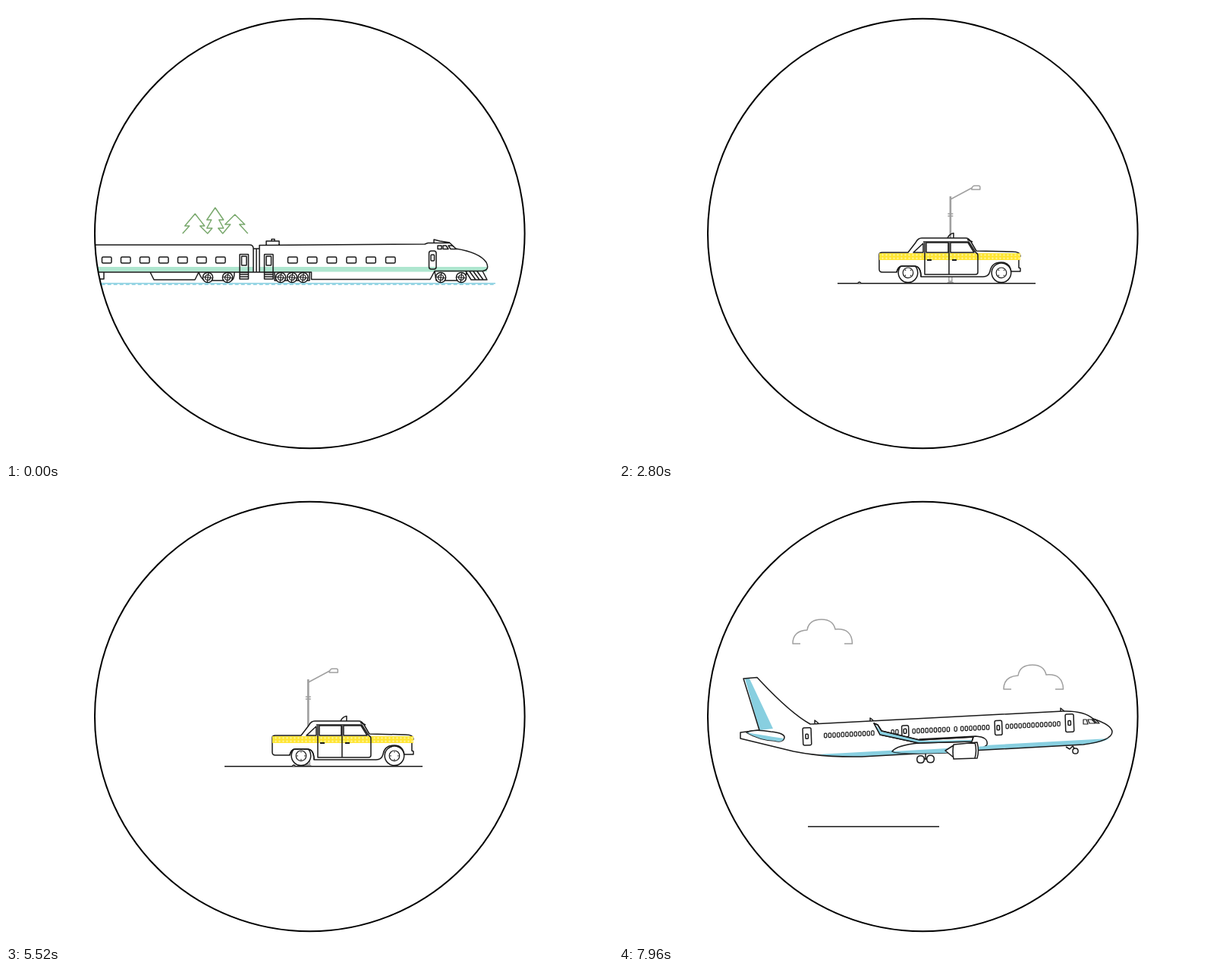
An HTML page for the animation above (8 s loop, 800 by 600 pixels).

```html
<!DOCTYPE html>
<html lang="en">
<head>
<meta charset="utf-8">
<title>Train, taxi, plane</title>
<style>
html, body { margin: 0; width: 100%; height: 100%; overflow: hidden; background: #fff; }
svg { display: block; width: 800px; height: 600px; }
</style>
</head>
<body>
<svg id="stage" viewBox="0 0 800 600" fill="none" stroke="#1a1a1a" stroke-width="1.5" stroke-linejoin="round">
  <defs>
    <pattern id="check" width="5" height="4.5" y="326" patternUnits="userSpaceOnUse">
      <path d="M0 0H5V4.5H0Z" fill="#ffe534" stroke="none"/>
      <path d="M2.5 .8L4 2.2L2.5 3.7L1 2.2Z" fill="#fff5a8" stroke="none"/>
    </pattern>
    <clipPath id="disc"><circle cx="400.3" cy="300" r="283"/></clipPath>
    <clipPath id="street"><rect x="274.5" y="230" width="287" height="140"/></clipPath>
    <clipPath id="road"><rect x="288" y="355" width="261" height="20"/></clipPath>
  </defs>
</svg>
<script>
const stage = document.getElementById('stage');
const BLUE = '#88cfe0', YELLOW = '#ffe40a', MINT = '#aee6cf', GREY = '#a0a0a0', GREEN = '#7aa96e';

function add(parent, tag, attrs = {}) {
  const el = document.createElementNS('http://www.w3.org/2000/svg', tag);
  for (const k in attrs) el.setAttribute(k, attrs[k]);
  return parent.appendChild(el);
}
const group = (parent, attrs) => add(parent, 'g', attrs);
function wipe(id) {
  return add(add(stage.querySelector('defs'), 'clipPath', { id }), 'rect', { y: 0, height: 600 });
}

// Strokes that draw themselves during [in0, in1] and retract during [out0, out1].
const strokes = [];
function line(parent, d, times, attrs = {}) {
  const el = add(parent, 'path', { d, pathLength: 1, ...attrs });
  if (times) strokes.push({ el, times });
  return el;
}
const spinners = [];
function wheel(parent, cx, cy, r, spokes, times) {
  const ring = q => `M${cx - q} ${cy}a${q} ${q} 0 1 1 ${2 * q} 0a${q} ${q} 0 1 1 ${-2 * q} 0`;
  line(parent, ring(r), times, { fill: '#fff' });
  const hub = group(parent);
  line(hub, ring(r * .53), times, { 'stroke-width': 1.2 });
  line(hub, spokes, times, { 'stroke-width': 1.2, transform: `translate(${cx} ${cy})` });
  spinners.push({ hub, cx, cy, r });
}
const box = (x, y, w, h, r = 1.5) =>
  `M${x + r} ${y}h${w - 2 * r}q${r} 0 ${r} ${r}v${h - 2 * r}q0 ${r} ${-r} ${r}h${2 * r - w}q${-r} 0 ${-r} ${-r}v${2 * r - h}q0 ${-r} ${r} ${-r}z`;

const progress = (t, a, b) => Math.min(1, Math.max(0, (t - a) / (b - a)));
const smooth = p => .5 - .5 * Math.cos(Math.PI * p);
function along(t, keys, ease = p => p) {
  if (t <= keys[0][0]) return keys[0][1];
  for (let i = 1; i < keys.length; i++) {
    const [t0, v0] = keys[i - 1], [t1, v1] = keys[i];
    if (t <= t1) return v0 + (v1 - v0) * ease(progress(t, t0, t1));
  }
  return keys.at(-1)[1];
}
const shift = (el, x, y = 0) => el.setAttribute('transform', `translate(${x} ${y})`);
const show = (el, on) => el.setAttribute('display', on ? 'inline' : 'none');
const span = (rect, a, b) => {
  rect.setAttribute('x', a);
  rect.setAttribute('width', Math.max(0, b - a));
};

const scene = group(stage, { 'clip-path': 'url(#disc)' });

// Railway
const trees = [0, 460].map(offset => ({
  offset,
  el: line(scene, 'M233 300L242 290H236L249.500 274L262 290H256L266 300L272 293H265L271 282H265L276 266L287 282H281L287 293H280L286 300L296 288H289L302 275L315 288H308L319 300',
    offset ? [-1, 0, 1250, 1650] : null, { stroke: GREEN })
}));
const trackWipe = wipe('trackWipe'), trainWipe = wipe('trainWipe');
const rails = group(scene, { 'clip-path': 'url(#trackWipe)', stroke: BLUE });
add(rails, 'path', { d: 'M110 365.700H690' });
const sleepers = add(rails, 'path', { d: 'M110 367.200H690', 'stroke-dasharray': '5 3' });

const train = group(scene, { 'clip-path': 'url(#trainWipe)' });
add(train, 'path', { d: 'M110 347.300H326M334 347.300H634', stroke: MINT, 'stroke-width': 6.5 });
add(train, 'path', { d: [
  'M110 315H321Q326 315 326 320V351H110M110 360H129V351M190 351L195 361H249L254 351',
  'M326 320H334M330 320V351M326 351H334',
  'M254 351Q258 362 263 362H296Q301 362 301 351',
  'M334 351V315.500L552 314L556 312.500H585L593 320Q624 325 633 338Q638 348 628 349.500H565L559 360.500H402.500V351H334',
  'M343 315V310H360V315M350 310V307.500H354V310M564 312V308L572 310L585 312',
  'M354 351V362H400V351M565 350L567 362H605L607 350',
  'M606 350L613 361H634L628 349.500M611 350L619 361M616 350L624 361M621 350L629 361',
  'M569 316h5v4.500h-5zM576 316h4l3 4.500h-7zM583 316h5l6 4.500h-8z',
  box(557.5, 323, 9.5, 24, 3), box(560, 328, 4.5, 8, 1)
].join('') });
for (let i = 0; i < 7; i++) add(train, 'path', { d: box(126.5 + 25 * i, 331, 12.5, 8) });
for (let i = 0; i < 6; i++) add(train, 'path', { d: box(371.5 + 25.8 * i, 331, 12.5, 8) });
for (const x of [308, 340.5]) add(train, 'path', {
  d: box(x, 327.5, 11.5, 24, .5) + box(x + 2.5, 330, 6.5, 12, .5) + `M${x} 351v9h11.500v-9m0 3h-11.500m0 3h11.500`
});
for (const x of [266, 292, 362, 377, 391.5, 573, 600])
  wheel(train, x, 358, 6.6, 'M-6 0H6M0 -6V6');

// Street
const street = group(scene, { 'clip-path': 'url(#street)', stroke: GREY });
const lamps = [0, 1, 2].map(() => {
  const lamp = group(street);
  add(lamp, 'path', { d: 'M0 251V338', 'stroke-width': 2.6 });
  add(lamp, 'path', { d: 'M-3.500 274H3.500M-3.500 277H3.500M0 255L28 240M28 241Q29 237 32 237H37Q39 237 39 239V242H28ZM-2 337H2V363H-2ZM-4 364.500H4' });
  return lamp;
});
const ground = add(scene, 'path');
const road = group(scene, { 'clip-path': 'url(#road)' });
const bumps = [0, 1, 2].map(() => add(road, 'path', { d: 'M-2 365.500Q0 362.500 2 365.500', fill: '#fff' }));

// Taxi
const car = group(scene);
const tyre = 'M-4 -4l1 1M4 -4l-1 1M-4 4l1 -1M4 4l-1 -1';
wheel(car, 381, 351.8, 12.8, tyre, [1350, 1600, 6250, 6500]);
line(car, 'M480 357H398Q398 343 389 343H373Q368 343 366 351H347Q343 351 343 347V328Q343 325 347 325H381L391 312Q394 306 399 306H457Q461 306 464 311L471 323L519 324Q529 324 529 330L527 332V345L529 346V350H517Q515 338 504 338Q491 338 489 350Q487 357 480 357',
  [1350, 2000, 5780, 6100], { fill: '#fff' });
line(car, 'M343 330.500H529', [1250, 1650, 5780, 6080], { stroke: 'url(#check)', 'stroke-width': 9 });
line(car, 'M398 357Q398 343 389 343H373Q368 343 366 351', [1350, 1600, 6250, 6500]);
wheel(car, 504, 351.8, 12.8, tyre, [1400, 1650, 5850, 6080]);
const cabin = [1800, 2150, 6250, 6500];
line(car, 'M403 312V354H435V312M435 354H470Q473 354 473 351V329Q473 326 470 325', cabin);
line(car, 'M388 325L401 313V325ZM405 312H434V325H405ZM437 312H460L468 325H437Z', cabin);
line(car, 'M401 311H461L470 325', cabin);
line(car, 'M406 335H412M439 335H445', [1900, 2100, 5800, 5950], { 'stroke-width': 2 });
line(car, 'M433 306Q436 300 441 299.500V306M459 308L466 311', [1450, 1700, 5900, 6080]);
line(car, 'M463 308L469 317H514', [1350, 1650, 1730, 2000]);
line(car, 'M439 314V310H460L470 324H502Q514 324 515 337H558', [1350, 1700, 1770, 2050]);

// Lines flowing from taxi to plane
for (const d of ['M543 305H434Q425 332 403 332', 'M534 305L543 298H520', 'M470 359H403', 'M575 360H495'])
  line(scene, d, [5850, 6120, 6220, 6550]);
line(scene, 'M444 330H436Q430 330 430 338Q430 345.500 426 345.500H366', [5850, 6120, 6180, 6480],
  { stroke: YELLOW, 'stroke-width': 7 });

// Plane
const planeWipe = wipe('planeWipe');
const planeFrame = group(scene, { 'clip-path': 'url(#planeWipe)' });
const plane = group(planeFrame);
const NEVER = [9000, 9001];
const tint = d => line(plane, d, [5800, 5850, ...NEVER], { fill: BLUE, stroke: 'none' });
const gear = group(plane);
const hull = [6230, 6750, ...NEVER], detail = [6350, 6700, ...NEVER];
tint('M262 350L646 329Q636 335 612 337L320 353Q290 354 262 350Z');
tint('M166 250L172 250L203 316L185 318Z');
line(plane, 'M650 320Q649 311 625 303Q612 292 585 293L252 310Q225 295 182 248.500L164 250L185 318L160 321V329L230 346Q270 354 320 353L612 337Q650 332 650 320', hull);
line(plane, 'M168 321Q178 316 200 320Q219 322 218 328Q216 335 205 332Q185 331 168 321Z', detail, { fill: '#fff' });
tint('M168 321Q185 324 217 329Q215 335 205 332Q185 331 168 321Z');
line(plane, 'M258 309V305L263 309M331 306V302L335 305M582 293V289L587 293', detail);
line(plane, 'M612 304H616L618 310H612ZM618 304H623L628 309H620ZM624 303L628 304L633 309H630Z', detail, { 'stroke-width': 1.2 });
for (const [x, y, w, h] of [[242, 315, 11, 23], [372.5, 312, 9, 15], [495, 305.5, 9.5, 19], [588, 297, 11, 23.5]]) {
  const start = 5900 + (588 - x) * 1.3;
  line(plane, box(x, y, w, h, 2) + box(x + w / 2 - 2, y + h / 2 - 3, 3.5, 6, 1),
    [start, start + 120, ...NEVER], { transform: `rotate(-2 ${x} ${y})` });
}
for (const [from, count] of [[270.5, 12], [359, 2], [387, 9], [442, 1], [450.5, 7], [510, 13]])
  for (let i = 0; i < count; i++) {
    const x = from + i * 5.65, start = 6110 + (583 - x) * 1.5;
    line(plane, box(x, 322 - (x - 272) * .05, 3.4, 5.8, 1.3), [start, start + 80, ...NEVER], { 'stroke-width': 1.2 });
  }
line(plane, 'M360 346Q366 338 395 335L396 330L470 326Q487 327 485 337Q482 344 430 348Q370 350 360 346Z', detail, { fill: '#fff' });
tint('M360 346Q400 344 485 339Q482 345 430 348Q370 350 360 346Z');
line(plane, 'M336 309L341 311L346 319L396 331L467 327L465 333L395 335L344 324Z', detail, { fill: '#fff' });
tint('M337 310L346 320L400 332L465 331L465 333L395 335L344 324Z');
line(plane, 'M336 309L341 311L346 319L396 331L467 327L465 333L395 335L344 324Z', detail);
line(plane, 'M441 338L430 345L441 354M441 337L472 334Q475 345 472 355L441 356Q439 346 441 337ZM469 334Q472 345 469 355', detail, { fill: '#fff' });
line(gear, 'M404 348V357M397 356H411M589 340L594 343L598 339L602 345', detail);
for (const [x, y, r] of [[397.5, 356.5, 4.8], [410.5, 356, 4.8], [601.5, 345.5, 3.6]])
  line(gear, box(x - r, y - r, 2 * r, 2 * r, r), detail, { fill: '#fff' });

const clouds = [[0, 0], [278, 60]].map(([x, y]) => ({
  x, y,
  el: add(scene, 'path', { d: 'M239 204H229Q229 187 248 186Q250 172 267 172Q282 172 285 185Q307 183 307.500 204H297', stroke: GREY })
}));

add(stage, 'circle', { cx: 400.3, cy: 300, r: 283.3, stroke: '#000', 'stroke-width': 2 });

function render(t) {
  for (const { el, times: [in0, in1, out0, out1] } of strokes) {
    const a = progress(t, out0, out1), b = progress(t, in0, in1), whole = a === 0 && b === 1;
    show(el, b > a);
    el.setAttribute('stroke-dasharray', whole ? 'none' : `0 ${a} ${b - a} 2`);
    el.setAttribute('fill-opacity', whole ? 1 : 0);
  }

  for (const { el, offset } of trees) shift(el, offset - t * .3);
  span(trackWipe, along(t, [[300, 110], [880, 173], [1760, 571], [1950, 645]]), along(t, [[900, 645], [1760, 631], [1950, 628]]));
  span(trainWipe, along(t, [[300, 110], [880, 173], [1650, 400]]), along(t, [[750, 690], [1650, 400]]));
  sleepers.setAttribute('stroke-dashoffset', t * .3);

  const scroll = along(t, [[0, -497], [2800, 0], [4040, 221], [4880, 386], [6160, 639], [8000, 1003]]);
  lamps.forEach((el, i) => {
    shift(el, 437 + 237 * i - scroll);
    show(el, t > 2000 && t < 6500);
  });
  bumps.forEach((el, i) => {
    shift(el, 317 + 287.5 * i - scroll);
    show(el, t > 2000 && t < 5900);
  });
  for (const { hub, cx, cy, r } of spinners)
    hub.setAttribute('transform', `rotate(${scroll / r * 180 / Math.PI} ${cx} ${cy})`);

  const lift = progress(t, 7560, 7960);
  const left = along(t, [[1500, 549], [1760, 407], [1950, 288], [5700, 288], [6160, 265], [6600, 124], [7400, 124], [7960, 249]]);
  const right = along(t, [[5700, 549], [6160, 567], [6600, 676], [7400, 676], [7960, 422]]);
  ground.setAttribute('d', `M${left} ${365.7 + 79.5 * lift ** 1.5}H${right}`);
  show(ground, t > 1500);

  shift(car, along(t, [[1760, -85], [2750, 0], [4800, -41], [4900, -41], [6600, 125]], smooth));

  span(planeWipe, along(t, [[5850, 330], [6160, 274], [6600, 100]]), 800);
  show(planeFrame, t > 5800);
  const planeX = along(t, [[5800, -341], [6850, 32], [7600, -12], [7960, 0]], smooth);
  plane.setAttribute('transform', `translate(${planeX} 0) rotate(${2.9 * (1 - smooth(lift))} 404 356)`);
  shift(gear, 0, 4.5 * (1 - lift));

  for (const { el, x, y } of clouds) {
    shift(el, x + 140 * (1 - lift), y - 190 * (1 - lift));
    show(el, lift > 0);
  }
}

function tick(now) {
  render(now % 8000);
  requestAnimationFrame(tick);
}
render(0);
requestAnimationFrame(tick);
</script>
</body>
</html>
```
